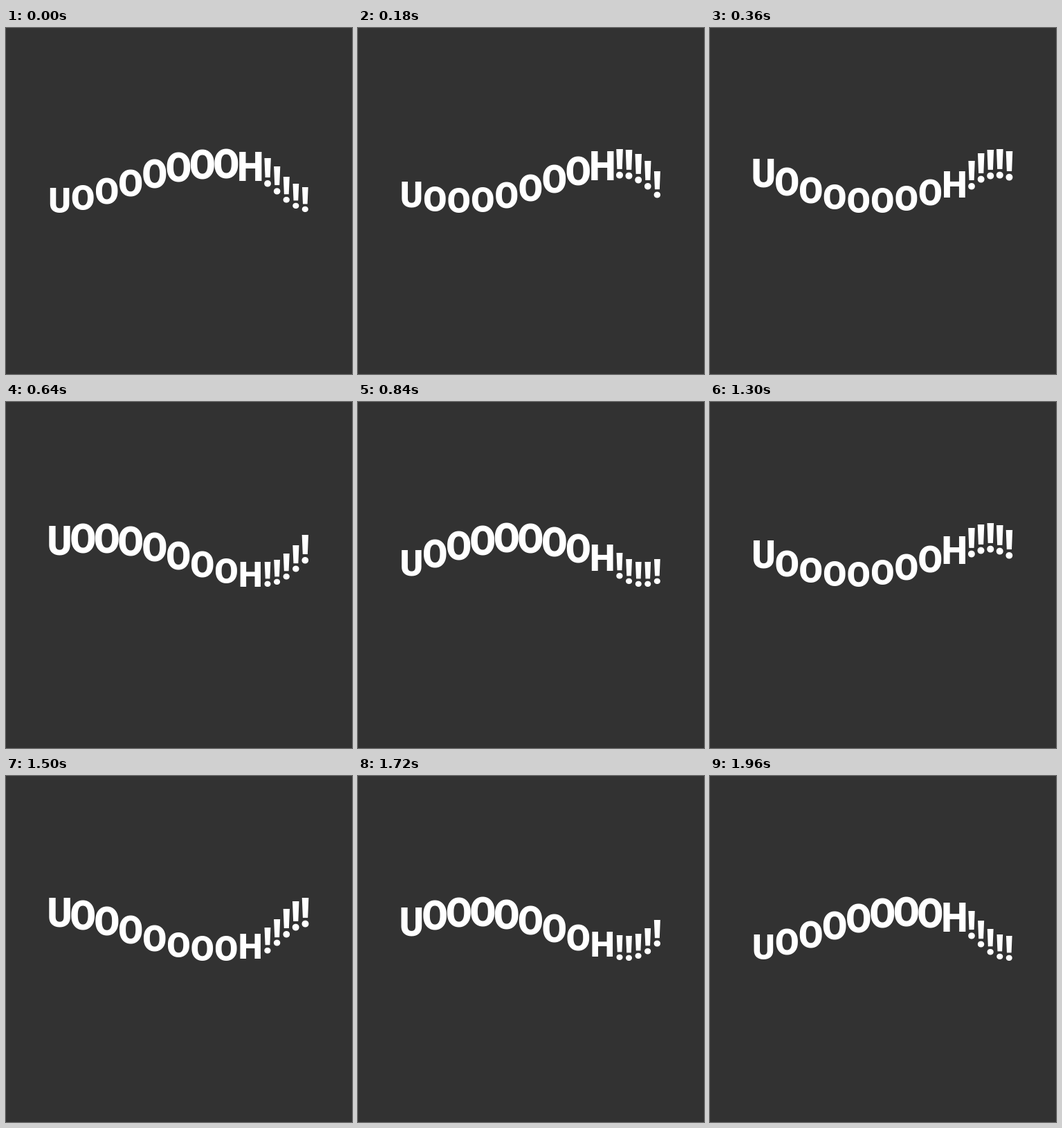
Write an HTML page with a canvas that moves like this. It is 500 by 500 pixels and loops after 1.98 s.

```html
<!DOCTYPE html>
<html lang="en">
<head>
<meta charset="utf-8">
<title>Wave</title>
<style>
  html, body { margin: 0; width: 100%; height: 100%; overflow: hidden; background: #323232; }
  canvas { display: block; width: 500px; height: 500px; }
</style>
</head>
<body>
<canvas id="stage" width="500" height="500"></canvas>
<script>
const ctx = document.getElementById('stage').getContext('2d');
const letters = [...'UOOOOOOOH!!!!!'];

const LOOP = 1980, STEP = 20;
const PERIOD = 1000, DELAY = 70, START = 963;
const REST_Y = 250.7, LIFT = 54.1, BASELINE = 16.8;
const STRETCH_X = 0.11, STRETCH_Y = 0.22;
const FAMILY = 'Roboto, Arial, sans-serif';
const SPACING_FONT = '700 50px ' + FAMILY;
const GLYPH_FONT = '900 49.2px ' + FAMILY;

// cubic-bezier(.42, 0, .58, 1), solved by bisection
function easeInOut(x) {
  let lo = 0, hi = 1, s = x;
  for (let i = 0; i < 24; i++) {
    s = (lo + hi) / 2;
    const bx = 3 * s * (1 - s) * (1 - s) * 0.42 + 3 * s * s * (1 - s) * 0.58 + s * s * s;
    if (bx < x) lo = s; else hi = s;
  }
  return s * s * (3 - 2 * s);
}

function rise(t, i) {
  const p = (t + START - i * DELAY + PERIOD) % PERIOD / (PERIOD / 2);
  return easeInOut(p < 1 ? p : 2 - p);
}

function draw(t) {
  ctx.setTransform(1, 0, 0, 1, 0, 0);
  ctx.fillStyle = '#323232';
  ctx.fillRect(0, 0, 500, 500);

  // heavy glyphs sit centred in slightly tighter bold advances
  ctx.font = SPACING_FONT;
  const widths = letters.map(c => ctx.measureText(c).width);
  let x = 250 - widths.reduce((a, b) => a + b) / 2;

  ctx.font = GLYPH_FONT;
  ctx.textAlign = 'center';
  ctx.textBaseline = 'alphabetic';
  ctx.fillStyle = '#fff';
  letters.forEach((c, i) => {
    const u = rise(t, i);
    ctx.setTransform(1 + STRETCH_X * u, 0, 0, 1 + STRETCH_Y * u,
                     x + widths[i] / 2, REST_Y - LIFT * u);
    ctx.fillText(c, 0, BASELINE);
    x += widths[i];
  });
}

const begin = performance.now();
function tick() {
  const t = (performance.now() - begin) % LOOP;
  draw(Math.floor(t / STEP) * STEP);
  requestAnimationFrame(tick);
}
tick();
</script>
</body>
</html>
```
